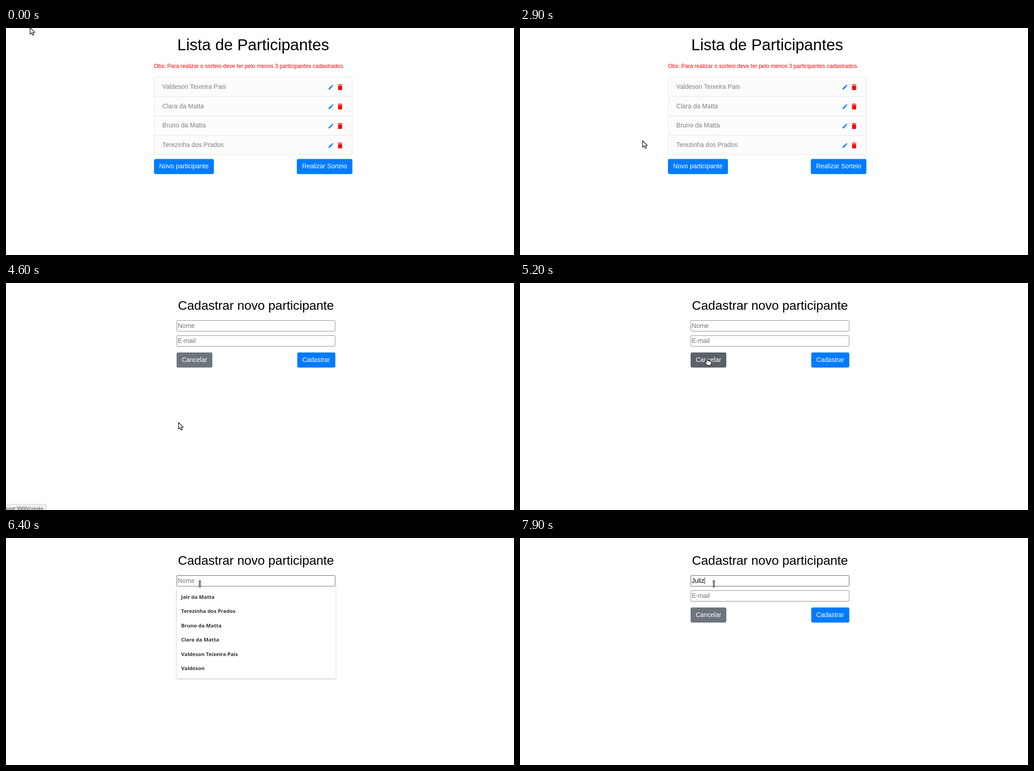
Animation, 1119 px wide and 500 px high, one loop 8000 ms. Source, as an HTML page:

```html
<!DOCTYPE html>
<html lang="pt-BR">
<head>
<meta charset="utf-8">
<title>Lista de Participantes</title>
<style>
html, body { margin: 0; width: 100%; height: 100%; overflow: hidden; background: #fff; }
#stage {
  position: absolute; left: 0; top: 0; width: 1280px; height: 572px; overflow: hidden;
  transform: scale(.874); transform-origin: 0 0;
  font: 16px/24px "Liberation Sans", Arial, sans-serif; color: #000; white-space: nowrap;
}
#stage div { position: absolute; box-sizing: border-box; }
#stage .page { inset: 0; }
.title { text-align: center; line-height: 1.2; }
.note { left: 373px; top: 86px; font-size: 14px; line-height: 21px; color: #f00; }
.list { left: 373px; top: 123px; width: 500px; height: 197px; border: 1px solid #dfdfdf; border-radius: 4px; background: #fcfcfc; }
.row { left: 0; width: 498px; height: 49px; padding: 12px 20px; color: #808080; }
.row + .row { border-top: 1px solid #dfdfdf; margin-top: -1px; padding-top: 12px; }
.row svg { position: absolute; }
.pen { left: 436.5px; top: 17px; width: 16px; height: 16px; fill: #007bff; }
.bin { left: 458px; top: 15px; width: 20px; height: 20px; fill: #f00; }
.btn { height: 38px; padding: 7px 13px; border-radius: 4px; color: #fff; background: #007bff; }
.btn.hover { background: #0069d9; }
.btn.gray { background: #6c757d; }
.btn.gray.hover { background: #5a6268; }
.input { left: 430px; width: 400px; height: 28px; border: 1px solid #767676; border-radius: 2.5px; padding: 1px 1.7px; color: #757575; background: #fff; }
.input.hover { border-color: #444; }
.input.filled { color: #000; }
#caret { top: 99.3px; width: 1px; height: 17.2px; background: #000; }
#menu { left: 429.5px; top: 122px; width: 401px; padding: 8px 12px; background: #fff; border-radius: 0 0 3px 3px;
  box-shadow: 0 1px 3px rgba(0,0,0,.35); font: 600 13px/36px "Noto Sans", sans-serif; color: #333; }
#menu p { margin: 0; }
#status { left: -90px; top: 557px; width: 192px; height: 24px; padding-right: 7px; text-align: right; background: #efefef;
  border: 1px solid #ccc; border-radius: 0 4px 0 0; font: 12.2px/22px "Noto Sans", sans-serif; color: #333; }
#pointer { position: absolute; left: 0; top: 0; width: 30px; height: 30px; overflow: visible; }
#pointer path { fill: #fff; stroke: #111; stroke-width: 1.3; stroke-linejoin: round; }
#beam path { fill: none; stroke-width: 3.2; }
#beam path + path { stroke: #fff; stroke-width: 1; }
</style>
</head>
<body>
<div id="stage">
  <div class="page" id="listPage">
    <div class="title" style="left:373px;top:18px;width:500px;font-size:40px">Lista de Participantes</div>
    <div class="note">Obs: Para realizar o sorteio deve ter pelo menos 3 participantes cadastrados.</div>
    <div class="list" id="rows"></div>
    <div class="btn" id="newBtn" style="left:373px;top:330px">Novo participante</div>
    <div class="btn" style="right:407px;top:330px">Realizar Sorteio</div>
  </div>
  <div class="page" id="formPage">
    <div class="title" style="left:430px;top:38px;width:400px;font-size:32px">Cadastrar novo participante</div>
    <div class="input" id="nameInput" style="top:94px"></div>
    <div class="input" id="mailInput" style="top:132px">E-mail</div>
    <div class="btn gray" id="cancelBtn" style="left:430px;top:175px">Cancelar</div>
    <div class="btn" style="right:450px;top:175px">Cadastrar</div>
    <div id="caret"></div>
    <div id="menu"></div>
  </div>
  <div id="status">localhost:3000/create</div>
</div>
<svg id="pointer">
  <path id="arrow" d="M0 .5V14.8L3.6 11.5 6 17 8.5 15.9 6.2 10.6H10.6Z"/>
  <g id="hand">
    <path d="M-1.5 8.5V2a1.5 1.5 0 0 1 3 0V5.4q2.5-.8 3 .5 2-.6 2.7.6 2.3-.3 2.3 1.7V11q0 2-1.5 4H0L-4.5 9.8q-1-1.6.4-2.1 1.2-.3 2.6 1.3Z"/>
    <path d="M1.5 9.5v.6M4.2 9.5v.6M6.9 9.5v.6"/>
  </g>
  <g id="beam">
    <path d="M-2.5-6H-1Q0-6 0-5V5Q0 6-1 6H-2.5M2.5-6H1Q0-6 0-5M2.5 6H1Q0 6 0 5"/>
    <path d="M-2.5-6H-1Q0-6 0-5V5Q0 6-1 6H-2.5M2.5-6H1Q0-6 0-5M2.5 6H1Q0 6 0 5"/>
  </g>
</svg>
<script>
const LOOP = 8000, STEP = 100;
const $ = id => document.getElementById(id);
const show = (id, on) => $(id).style.display = on ? '' : 'none';
const hover = (id, on) => $(id).classList.toggle('hover', on);
const between = (v, a, b) => v >= a && v < b;

const people = ['Valdeson Teixeira Pais', 'Clara da Matta', 'Bruno da Matta', 'Terezinha dos Prados'];
const match = 'Jair da Matta';
const history = [match, ...people.slice().reverse(), 'Valdeson'];

const pen = '<svg class="pen" viewBox="0 0 512 512"><path d="M64 368v80h80l236-236-80-80zM442 150q12-15 0-30l-50-50q-15-12-30 0l-40 40 80 80z"/></svg>';
const bin = '<svg class="bin" viewBox="0 0 512 512"><path d="M128 405q2 41 43 43h170q41-2 43-43V160H128zM416 96h-80l-27-32H203l-27 32H96v32h320z"/></svg>';
$('rows').innerHTML = people.map((name, i) =>
  `<div class="row" style="top:${i * 49}px">${name}${pen}${bin}</div>`).join('');

// Pointer stops: time, x, y
const path = [
  [1000, 53, -1], [1900, 60, 15], [2400, 160, 187], [2600, 160, 187],
  [3200, 380, 309], [3300, 380, 309], [3600, 380, 307], [4700, 380, 307], [5500, 427, 101]
];

function pointerAt(t) {
  const i = path.findIndex(p => p[0] > t);
  if (i === 0) return path[0].slice(1);
  if (i < 0) return path[path.length - 1].slice(1);
  const [t0, x0, y0] = path[i - 1], [t1, x1, y1] = path[i];
  let u = (t - t0) / (t1 - t0);
  if (t >= 2600) u = u * u * (3 - 2 * u);
  return [x0 + (x1 - x0) * u, y0 + (y1 - y0) * u];
}

function typedAt(t) {
  const keys = [6700, 7000, 7200, 7300, 7900];
  return 'Juliz'.slice(0, keys.filter(k => t >= k).length);
}

const caretStops = { '': 0, J: 8, Ju: 17, Jul: 20.5, Juli: 24, Juliz: 32 };

function drawMenu(t) {
  const items = between(t, 5800, 6800) ? history : between(t, 6800, 7100) ? [match] : [];
  show('menu', items.length > 0);
  const html = items.map(name => `<p>${name}</p>`).join('');
  if ($('menu').innerHTML !== html) $('menu').innerHTML = html;
}

function draw(t) {
  const onForm = t >= 4500;
  const [x, y] = pointerAt(t);
  show('listPage', !onForm);
  show('formPage', onForm);

  const overNew = !onForm && between(x, 326, 457) && between(y, 288, 321);
  const overCancel = onForm && between(x, 376, 455) && between(y, 153, 186);
  const overMail = onForm && x > 376 && between(y, 115, 140);
  const overName = onForm && x > 376 && between(y, 82, 107);
  hover('newBtn', overNew);
  hover('cancelBtn', overCancel);
  hover('mailInput', overMail);
  hover('nameInput', overName);

  const hand = overNew || overCancel || between(t, 4500, 4600);
  const beam = overMail || overName;
  show('hand', hand);
  show('beam', beam);
  show('arrow', !hand && !beam);
  $('pointer').style.transform = `translate(${x}px, ${y}px)`;

  const fade = t < 4700 ? (t - 3300) / 300 : (5000 - t) / 300;
  $('status').style.opacity = Math.max(0, Math.min(1, fade));

  const typed = typedAt(t);
  $('nameInput').textContent = typed || 'Nome';
  $('nameInput').classList.toggle('filled', typed !== '');
  show('caret', between(t, 5900, 6400) || t >= 6700);
  $('caret').style.left = 432.6 + caretStops[typed] + 'px';
  drawMenu(t);
}

function tick() {
  const t = performance.now() % LOOP;
  draw(Math.floor(t / STEP) * STEP);
  requestAnimationFrame(tick);
}
tick();
</script>
</body>
</html>
```
